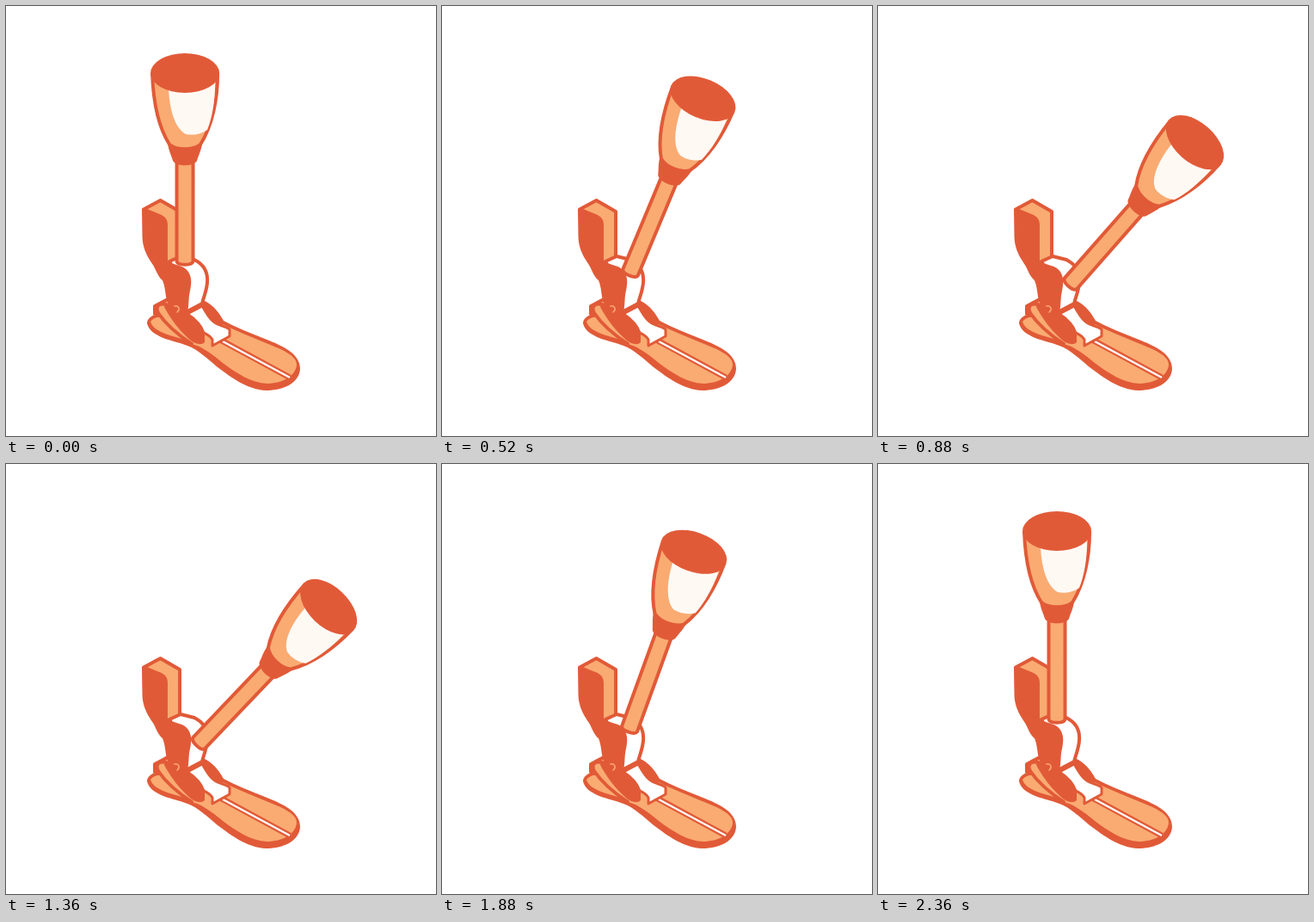
An HTML page that plays this animation: 500 by 500 pixels, repeating every 2.68 s.

```html
<!DOCTYPE html>
<html lang="en">
<head>
<meta charset="utf-8">
<title>Prosthetic foot</title>
<style>
html, body { margin: 0; width: 100%; height: 100%; overflow: hidden; background: #fff; }
svg { display: block; width: 100vw; height: 100vh; }
.red { fill: #e15a38; }
.skin { fill: #f9ab72; }
.white { fill: #fff; }
.line { stroke: #e15a38; stroke-width: 4; stroke-linejoin: round; stroke-linecap: round; }
.none { fill: none; }
</style>
</head>
<body>
<svg viewBox="0 0 500 500">
  <!-- sole -->
  <path class="red" d="M164 369C164 363 170 359 178 358L228 342C239 346 247 356 253 366C268 374 284 380 301 387C324 396 342 405 342 422C341 437 325 447 302 447C281 446 262 432 246 420C234 410 224 400 211 395C196 389 168 386 164 369Z"/>
  <path class="skin" d="M168 367C171 363 176 361 181 362L252 370C268 378 284 384 300 391C320 399 338 406 338 417C337 430 322 439 303 439C285 438 268 427 252 415C239 404 227 396 213 390C198 384 172 381 168 367Z"/>
  <path class="line none" style="stroke-width:7;stroke-linecap:butt" d="M247 387L330 432"/>
  <path d="M252 390L330 432" stroke="#fff" stroke-width="2.2"/>
  <!-- heel spring -->
  <path class="skin line" d="M173 349L188 341L200 348L186 362L173 358Z"/>
  <path class="skin" d="M186 347C178 345 173 349 177 357C185 369 198 381 216 393L238 400L241 388Z"/>
  <path class="line none" d="M186 347C178 345 173 349 177 357C185 369 198 381 216 393"/>
  <path class="red" d="M184 350C186 343 198 342 209 355C219 361 228 370 231 381V391C227 395 220 393 215 389C203 379 192 365 184 350Z"/>
  <!-- instep -->
  <path class="red" d="M224 344L231 343C241 348 249 357 254 370L240 372Z"/>
  <path class="white line" style="stroke-width:3" d="M211 358L228 349C233 356 236 365 244 369C250 372 257 373 260 376L260 384L240 395L240 388C237 383 234 382 230 380C227 371 220 364 211 358Z"/>
  <!-- heel block -->
  <path class="skin line" d="M160 236.500L179.500 226L202 239V292L186 300Z"/>
  <path class="red" d="M158 236L164 236L181 243C186 246 188 249 188 255V298L176 309C170 298 159 288 158.500 268Z"/>
  <!-- ankle -->
  <path class="white line" d="M190 297L203 291L219 295C231 301 235 311 234 322C233 332 230 338 228 346L209 356L202 320Z"/>
  <path class="red" d="M164 287C171 291 181 292 188 297C197 302 207 301 212 309C217 317 215 325 214 331C212 339 213 347 211 357L191 350C184 342 187 331 182 319C175 314 172 299 164 287Z"/>
  <path class="none" stroke="#c9583d" stroke-width=".8" opacity=".5" d="M167 288C175 287 181 291 185 299"/>
  <path class="none" stroke="#f9ab72" stroke-width="1.5" stroke-linecap="round" d="M196 349C201 348 203 353 199 356"/>
  <!-- pylon and socket -->
  <g id="leg">
    <path class="skin line" d="M198.500 178H217.500V297C216 302 200 302 198.500 297Z"/>
    <path class="red" d="M188 160H228C227 168 224 173 222 180C218 187 198 187 194 180C192 173 189 168 188 160Z"/>
    <path class="skin line" d="M170 79C171 108 176 139 190 161C199 168 217 168 226 161C240 139 246 108 246 79Z"/>
    <path fill="#fff9f4" d="M189 96L243 90C243 110 240 129 234 144C227 149 217 151 209 149C197 143 190 122 189 96Z"/>
    <ellipse class="red" cx="208" cy="78" rx="40" ry="23"/>
  </g>
</svg>
<script>
const LOOP = 2680, STEP = 40, SWING = 1040, TILT = 43.7;
const leg = document.getElementById('leg');
const begin = performance.now();

function ease(time, start) {
  const p = Math.min(1, Math.max(0, (time - start) / SWING));
  return p * p * (3 - 2 * p);
}

function draw(now) {
  const time = Math.floor((Math.max(0, now - begin) % LOOP) / STEP) * STEP;
  const angle = TILT * (ease(time, -13) - ease(time, 1330));
  leg.setAttribute('transform', `rotate(${angle.toFixed(3)} 181.5 331)`);
  requestAnimationFrame(draw);
}
draw(begin);
</script>
</body>
</html>
```
